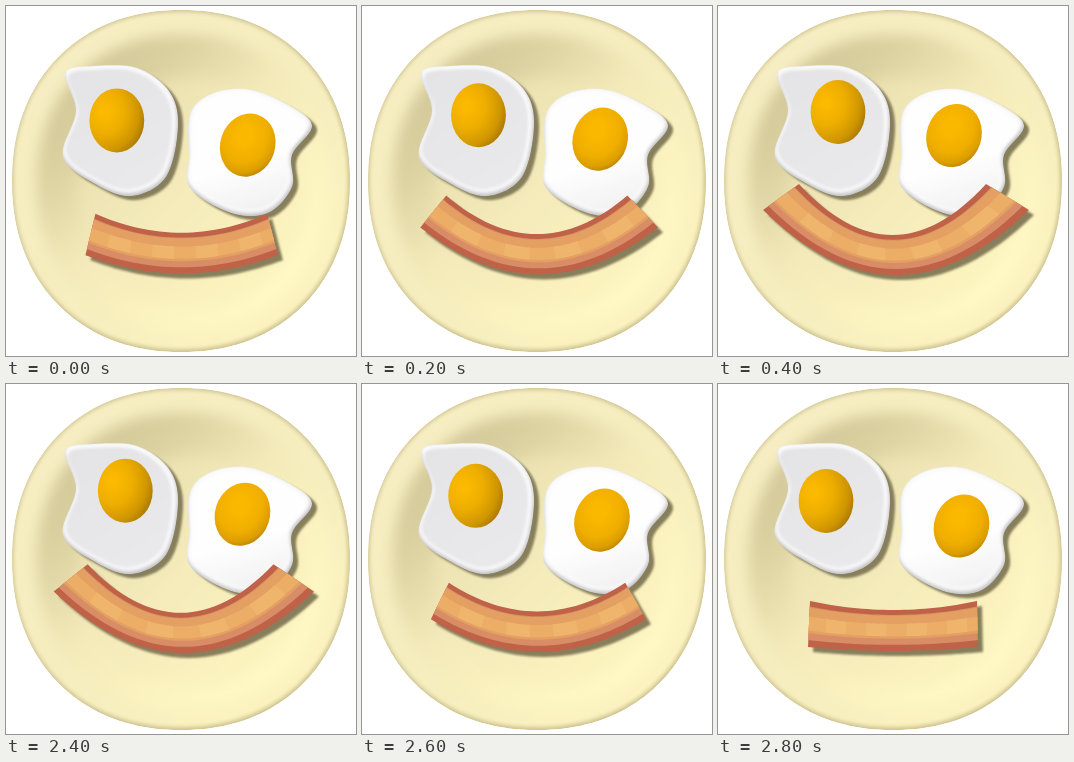
Recreate the animation shown at these times as an HTML page. Size 350 by 350 pixels, loop 4.8 s.

```html
<!DOCTYPE html>
<html lang="en">
<head>
<meta charset="utf-8">
<title>Breakfast face</title>
<style>
html, body { margin: 0; width: 100%; height: 100%; overflow: hidden; background: #fff; }
svg { display: block; width: 100vw; height: 100vh; }
</style>
</head>
<body>
<svg viewBox="0 0 350 350">
  <defs>
    <linearGradient id="base" x1=".1" y1=".1" x2=".85" y2=".9">
      <stop offset="0" stop-color="#f6edc2"/>
      <stop offset=".5" stop-color="#f6edbf"/>
      <stop offset="1" stop-color="#fbf3bf"/>
    </linearGradient>
    <linearGradient id="well" x1=".12" y1=".1" x2=".88" y2=".9">
      <stop offset="0" stop-color="#cfc596"/>
      <stop offset=".2" stop-color="#dbd1a1"/>
      <stop offset=".45" stop-color="#f3e9b9"/>
      <stop offset=".75" stop-color="#fcf4c0"/>
      <stop offset="1" stop-color="#fffac6"/>
    </linearGradient>
    <linearGradient id="floor" x1=".1" y1=".1" x2=".9" y2=".9">
      <stop offset="0" stop-color="#e8deae"/>
      <stop offset=".5" stop-color="#f5ebbb"/>
      <stop offset="1" stop-color="#fdf5bf"/>
    </linearGradient>
    <linearGradient id="greyWhite" x1=".2" y1="0" x2=".7" y2="1">
      <stop offset="0" stop-color="#e4e4e6"/>
      <stop offset="1" stop-color="#e9e9eb"/>
    </linearGradient>
    <linearGradient id="pureWhite" x1=".3" y1="0" x2=".6" y2="1">
      <stop offset=".6" stop-color="#fefefe"/>
      <stop offset="1" stop-color="#f1f1f2"/>
    </linearGradient>
    <radialGradient id="yolkL" cx=".28" cy=".36" r=".78">
      <stop offset=".1" stop-color="#fbb900"/>
      <stop offset=".45" stop-color="#eeae00"/>
      <stop offset=".8" stop-color="#ce9500"/>
      <stop offset="1" stop-color="#a87600"/>
    </radialGradient>
    <radialGradient id="yolkR" cx=".4" cy=".38" r=".68">
      <stop offset=".2" stop-color="#fab800"/>
      <stop offset=".6" stop-color="#f0af00"/>
      <stop offset=".85" stop-color="#dc9e00"/>
      <stop offset="1" stop-color="#b88000"/>
    </radialGradient>
    <filter id="soft"><feGaussianBlur stdDeviation=".8"/></filter>
    <filter id="edge"><feGaussianBlur stdDeviation="2"/></filter>
    <filter id="wide" x="-20%" y="-20%" width="140%" height="140%"><feGaussianBlur stdDeviation="7"/></filter>
  </defs>
  <g id="plate"></g>
  <g id="eggs"></g>
  <g id="yolks"></g>
  <g id="bacon"></g>
</svg>
<script>
const NS = 'http://www.w3.org/2000/svg';
const $ = id => document.getElementById(id);
function add(parent, tag, attrs) {
  const el = parent.appendChild(document.createElementNS(NS, tag));
  for (const k in attrs) el.setAttribute(k, attrs[k]);
  return el;
}
const mix = (a, b, t) => a + (b - a) * t;
const range = (n, f) => Array.from({ length: n }, (_, i) => f(i));
const toPath = pts => 'M' + pts.map(p => p.map(v => v.toFixed(2)).join(' ')).join('L') + 'Z';
const SHADOW = '#877f5c';

// Slightly squared circle
function disc(cx, cy, rx, ry) {
  const pow = v => Math.sign(v) * Math.abs(v) ** (2 / 2.16);
  return toPath(range(180, i => {
    const a = i * Math.PI / 90;
    return [cx + rx * pow(Math.cos(a)), cy + ry * pow(Math.sin(a))];
  }));
}

function drawPlate() {
  const g = $('plate'), d = disc(175, 175, 169, 171);
  add(add(g, 'clipPath', { id: 'rim' }), 'path', { d });
  const body = add(g, 'g', { 'clip-path': 'url(#rim)' });
  add(body, 'path', { d, fill: '#cabf8d' });
  const layer = (d, fill, blur) => add(body, 'path', { d, fill: `url(#${fill})`, filter: `url(#${blur})` });
  layer(disc(174.5, 174.5, 167.5, 169), 'base', 'edge');
  layer(disc(177, 177, 146, 148), 'well', 'wide');
  layer(disc(186, 187, 112, 114), 'floor', 'wide');
}

// Closed Catmull-Rom curve through a few points
function blob(pts) {
  const at = k => pts[(k + pts.length) % pts.length];
  return toPath(pts.flatMap((b, i) => range(10, k => {
    const t = k / 10, a = at(i - 1), c = at(i + 1), d = at(i + 2);
    return [0, 1].map(j => b[j] + t / 2 * (c[j] - a[j] +
      t * (2 * a[j] - 5 * b[j] + 4 * c[j] - d[j] + t * (3 * (b[j] - c[j]) + d[j] - a[j]))));
  })));
}

function egg(id, fill, pts) {
  const g = $('eggs'), d = blob(pts);
  add(g, 'path', { d, fill: SHADOW, transform: 'translate(5 4)', filter: 'url(#soft)' });
  add(add(g, 'clipPath', { id }), 'path', { d });
  const body = add(g, 'g', { 'clip-path': `url(#${id})` });
  add(body, 'path', { d, fill: '#bcbcc0' });
  add(body, 'path', { d, fill: '#fbfbfc', transform: 'translate(-.8 -2.5)', filter: 'url(#edge)' });
  const [x, y] = [0, 1].map(j => pts.reduce((s, p) => s + p[j], 0) / pts.length);
  add(body, 'path', {
    d, fill: `url(#${fill})`, filter: 'url(#edge)',
    transform: `translate(${x - 1} ${y - 1}) scale(.92) translate(${-x} ${-y})`
  });
}

drawPlate();
egg('eggL', 'greyWhite', [[59, 67], [88, 60], [131, 62], [163, 85], [172, 120], [160, 171],
  [126, 190], [91, 179], [57, 151], [70, 105]]);
egg('eggR', 'pureWhite', [[184, 108], [205, 88], [240, 83], [277, 96], [306, 119], [286, 149],
  [286, 181], [262, 207], [225, 207], [184, 182], [183, 150]]);

// Centres for a flat and for a smiling mouth
const yolks = [
  { id: 'yolkL', flat: [108, 117], smile: [120, 106], tilt: 0 },
  { id: 'yolkR', flat: [243.5, 142], smile: [236, 129.5], tilt: 18 }
];
for (const y of yolks) y.el = add($('yolks'), 'ellipse', { rx: 27.4, ry: 32, fill: `url(#${y.id})` });

// Each bacon edge is a parabola: left and right x, middle y, rise of the ends
const edges = {
  top: { flat: [92, 259, 226, 9], smile: [81, 268, 229, 51] },
  low: { flat: [90, 260, 267, 4], smile: [45, 311, 269, 65] }
};

const whole = [0, 1, 0, 1];
// Strips: v0, v1 across, u0, u1 along, colour
const strips = [
  [...whole, '#bf6248'],
  [.12, .85, 0, 1, '#d88d66'],
  [.14, .7, 0, 1, '#e3a062'],
  [.34, .64, 0, 1, '#ecad66'],
  ...range(4, i => [.34, .64, .1 + i * .24, .22 + i * .24, '#f0b56d'])
];
const shade = add($('bacon'), 'path', { fill: SHADOW, transform: 'translate(5 5)', filter: 'url(#soft)' });
const bands = strips.map(s => add($('bacon'), 'path', { fill: s[4] }));

function edgePoint({ flat, smile }, u, s) {
  const [l, r, y, rise] = flat.map((v, i) => mix(v, smile[i], s));
  return [mix(l, r, u), y - rise * (2 * u - 1) ** 2];
}
function band([v0, v1, u0, u1], s) {
  const line = v => range(33, i => {
    const u = mix(u0, u1, i / 32);
    const a = edgePoint(edges.top, u, s), b = edgePoint(edges.low, u, s);
    return [mix(a[0], b[0], v), mix(a[1], b[1], v)];
  });
  return toPath([...line(v0), ...line(v1).reverse()]);
}

function draw(s) {
  for (const { el, flat, smile, tilt } of yolks) {
    const [x, y] = flat.map((v, i) => mix(v, smile[i], s));
    el.setAttribute('transform', `translate(${x} ${y}) rotate(${tilt})`);
  }
  bands.forEach((b, i) => b.setAttribute('d', band(strips[i], s)));
  shade.setAttribute('d', band(whole, s));
}

// The smile grows and fades in equal steps, held at both ends
const LOOP = 4800, STEP = 100, GAIN = .235;
function smileAt(t) {
  const n = Math.floor(t / STEP);
  return Math.min(1, GAIN * Math.max(0, Math.min(n + 1, 28 - n)));
}

let start, shown;
function tick(now) {
  start ??= now;
  const s = smileAt((now - start) % LOOP);
  if (s !== shown) draw(shown = s);
  requestAnimationFrame(tick);
}
draw(shown = smileAt(0));
requestAnimationFrame(tick);
</script>
</body>
</html>
```
